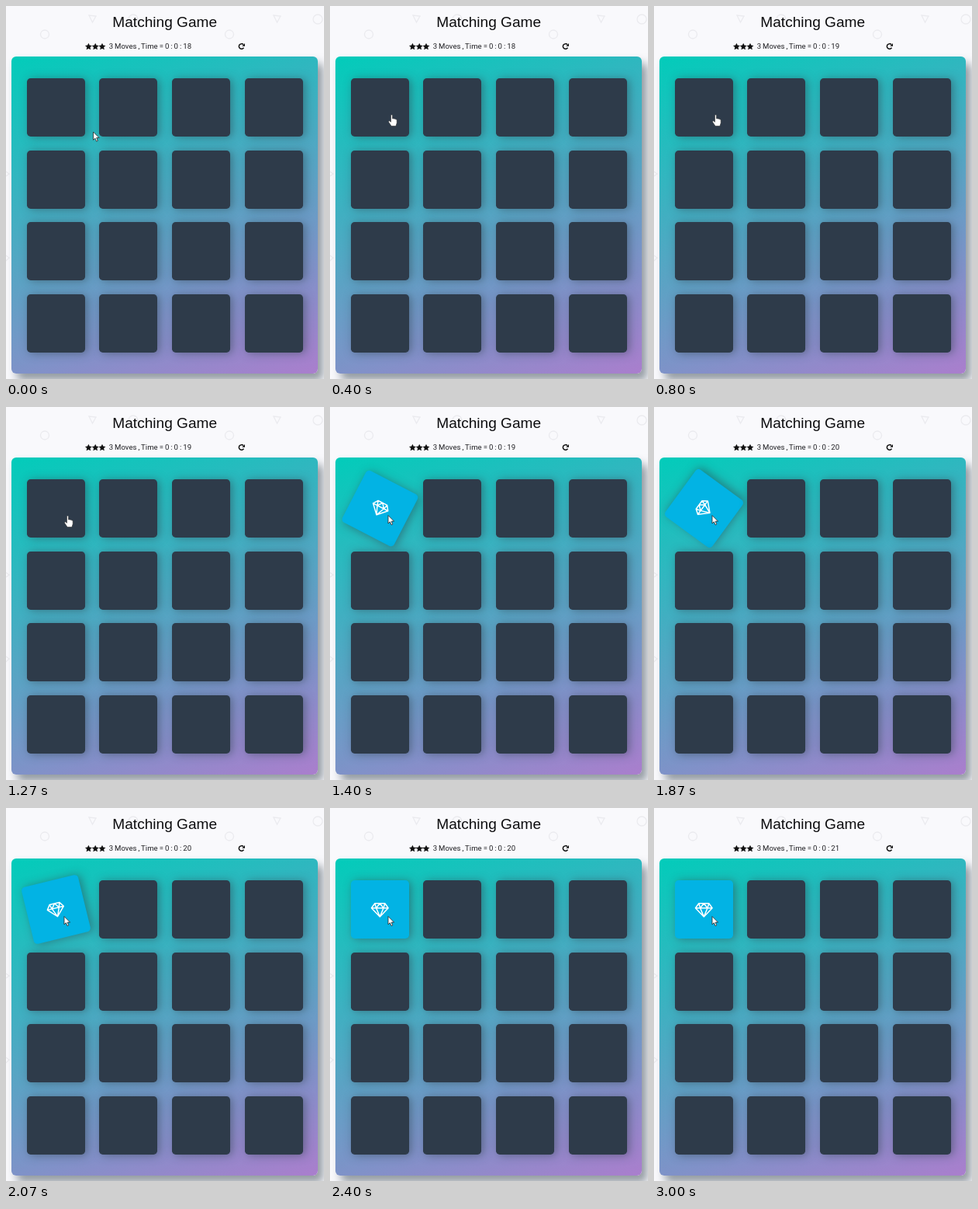
Write an HTML page that moves like this. It is 410 px wide and 480 px high and loops after 3.19 s.

```html
<!DOCTYPE html>
<html lang="en">
<head>
<meta charset="utf-8">
<title>Matching Game</title>
<style>
  html, body { margin: 0; width: 100%; height: 100%; overflow: hidden; background: #f9f9fc; }
  #stage { position: relative; width: 410px; height: 480px; overflow: hidden; }
  #stage > svg { position: absolute; left: 0; top: 0; }
  #board {
    position: absolute; left: 7px; top: 65px; width: 395px; height: 407.5px; border-radius: 6px;
    background: linear-gradient(160deg, #02ccba 0%, #aa7ecd 100%);
    box-shadow: 7px 9px 12px rgba(46, 61, 73, .5);
  }
  .card {
    position: absolute; width: 75px; height: 75px; border-radius: 4.8px;
    background: #2e3b4a; box-shadow: 3px 1px 12px rgba(46, 61, 73, .5);
  }
  .card.open { background: #02b3e4; }
  .card svg { display: none; }
  .card.open svg { display: block; }
  .title { font: 19.1px "Liberation Sans", Arial, sans-serif; fill: #0c0c0e; }
  .stats { font: 9.6px Roboto, sans-serif; fill: #202024; word-spacing: -.4px; }
</style>
</head>
<body>
<div id="stage">
  <svg width="410" height="480">
    <g fill="none" stroke="#ebebef" stroke-width="1.3">
      <g id="pattern">
        <circle cx="50" cy="36.500" r="5.500"/>
        <circle cx="164" cy="17" r="6"/>
        <path d="M107 12l9 1l-4.500 8z"/>
      </g>
      <use href="#pattern" x="238"/>
      <path d="M0 213l4 3l-4 3M0 321l4 3l-4 4"/>
    </g>
    <text class="title" x="204.700" y="27.300" text-anchor="middle">Matching Game</text>
    <path id="stars" fill="#111"/>
    <text class="stats" id="stats" x="132.700" y="55.400"></text>
    <path d="M306 49.600A3.300 3.300 0 1 0 306.500 53.600" fill="none" stroke="#111" stroke-width="1.500"/>
    <path d="M308 48v3.700h-3.700z" fill="#111"/>
  </svg>
  <div id="board"></div>
  <svg width="410" height="480">
    <g id="arrow" fill="#fff" stroke="#222" stroke-width=".8" stroke-linejoin="round">
      <path d="M0 0V10.400L2.400 8.200L4 12.200L5.800 11.400L4.200 7.600H7.600Z"/>
    </g>
    <g id="hand" fill="#fff" stroke="#333" stroke-width=".6" stroke-linejoin="round">
      <path d="M-1 .8Q0-.8 1 .8V5Q2 4.200 2.900 5.200Q4 4.600 4.800 5.700Q6.600 5.400 6.700 7V10.500L5.400 14.500H-.4L-3.800 9.400Q-4.400 7.600-2.800 7.800L-1 9.300Z"/>
    </g>
  </svg>
</div>
<script>
const LOOP = 3190, TICK = 200 / 3, LAST_TICK = 45;
const SPIN_START = 1313, SPIN_TIME = 1000;
const $ = id => document.getElementById(id);

const gem = `<svg width="75" height="75"><g transform="translate(37.300 37.700)"
  fill="none" stroke="#fff" stroke-width="1.500" stroke-linejoin="round">
  <path d="M-6.500-8H6.500L10.800-2L0 9.200L-10.800-2ZM-10.800-2H10.800M-6.500-8L-4.700-2L0-8L4.700-2L6.500-8M-4.700-2L0 9.200L4.700-2"/></g></svg>`;

for (let i = 0; i < 16; i++) {
  const card = document.createElement("div");
  card.className = "card";
  card.style.left = 19.5 + (i % 4) * 93.75 + "px";
  card.style.top = 28.2 + Math.floor(i / 4) * 92.5 + "px";
  $("board").append(card);
}
const spinCard = $("board").firstElementChild;
spinCard.innerHTML = gem;

function starPath(cx, cy, radius) {
  const points = Array.from({ length: 10 }, (_, i) => {
    const r = i % 2 ? radius * 0.48 : radius, a = (i * 36 - 90) * Math.PI / 180;
    return [cx + r * Math.cos(a), cy + r * Math.sin(a)].map(v => v.toFixed(2)).join(" ");
  });
  return "M" + points.join("L") + "Z";
}
$("stars").setAttribute("d", [0, 1, 2].map(i => starPath(106.4 + i * 8.8, 52.4, 4.7)).join(""));

// Cubic bezier easing, solved by bisection
function bezier(x1, y1, x2, y2) {
  const curve = (a, b, s) => 3 * (1 - s) ** 2 * s * a + 3 * (1 - s) * s * s * b + s ** 3;
  return p => {
    if (p <= 0 || p >= 1) return p <= 0 ? 0 : 1;
    let low = 0, high = 1;
    for (let i = 0; i < 30; i++) {
      const mid = (low + high) / 2;
      if (curve(x1, x2, mid) < p) low = mid; else high = mid;
    }
    return curve(y1, y2, low);
  };
}
const ease = bezier(0.25, 0.1, 0.25, 1);
const glide = bezier(0.3, 0.2, 0.5, 1);

function placeCursor(t, open) {
  const k = glide(t / 400);
  const x = open ? 75 : 112.5 + (79.5 - 112.5) * k;
  const y = open ? 139.5 : 162 + (140 - 162) * k;
  const pointing = !open && x < 101.5;
  for (const [id, shown] of [["arrow", !pointing], ["hand", pointing]]) {
    $(id).setAttribute("transform", `translate(${x} ${y})`);
    $(id).setAttribute("visibility", shown ? "visible" : "hidden");
  }
}

function draw(time) {
  const t = Math.min(LAST_TICK, Math.floor((time + 4) / TICK)) * TICK;
  const open = t >= SPIN_START;
  const seconds = 18 + Math.floor((t + 340) / 1000);
  $("stats").textContent = `3 Moves , Time = 0 : 0 : ${seconds}`;
  spinCard.classList.toggle("open", open);
  spinCard.style.transform = `rotate(${360 * ease((t - SPIN_START) / SPIN_TIME)}deg)`;
  placeCursor(t, open);
}

const start = performance.now();
function frame() {
  draw((performance.now() - start) % LOOP);
  requestAnimationFrame(frame);
}
frame();
</script>
</body>
</html>
```
